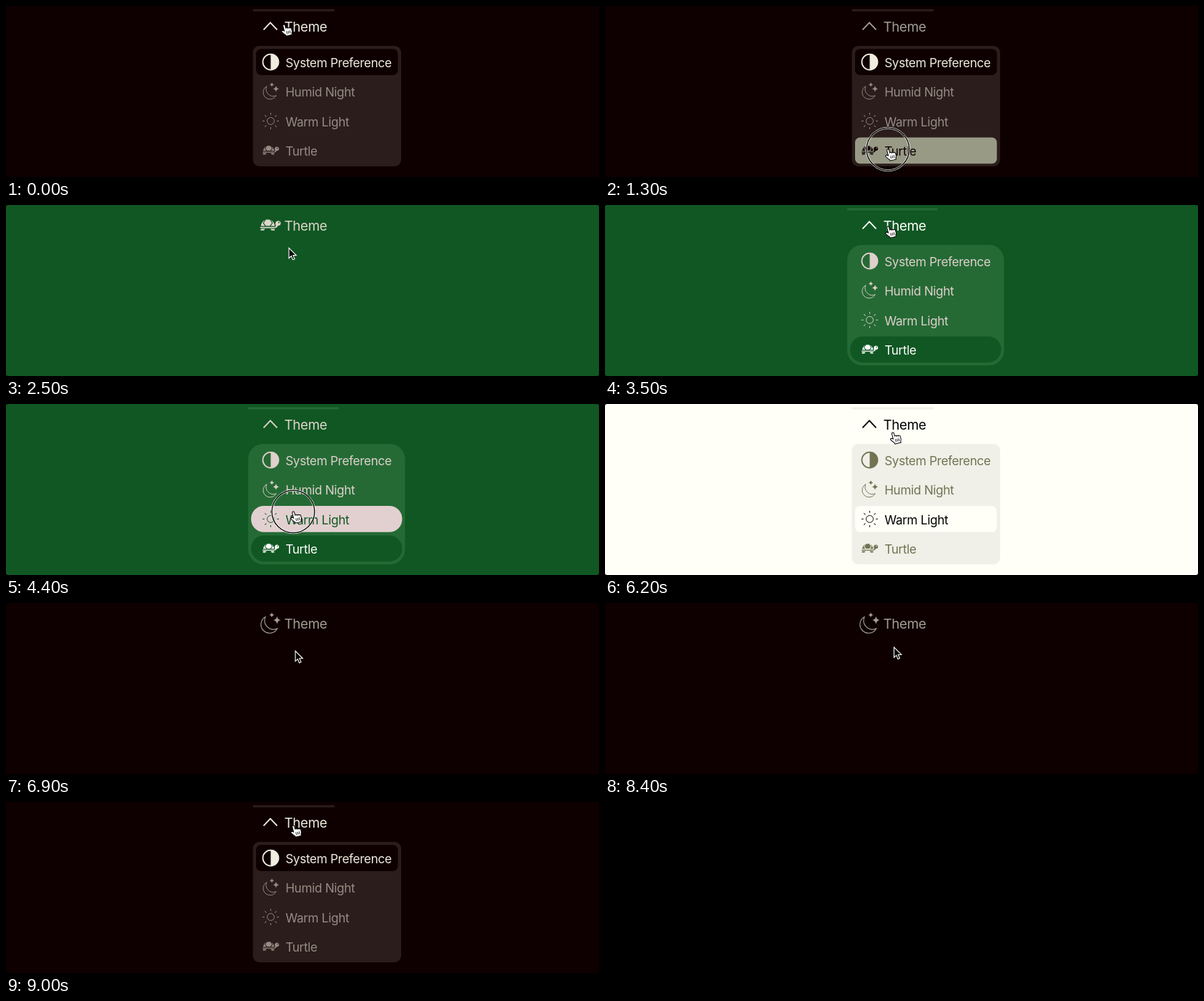
An HTML page that plays this animation: 830 by 240 pixels, repeating every 9200 ms.

```html
<!DOCTYPE html>
<html lang="en">
<head>
<meta charset="utf-8">
<title>Theme menu</title>
<style>
  html, body { margin: 0; width: 100%; height: 100%; overflow: hidden; background: #0a0505; }
  svg { display: block; width: 830px; height: 240px; font: 17.2px Inter, "Open Sans", sans-serif; letter-spacing: -.02em; }
  .title { font-size: 18.8px; }
  .line { fill: none; stroke: currentColor; }
  .fill { fill: currentColor; }
</style>
</head>
<body>
<svg id="stage" viewBox="0 0 830 240"></svg>
<script>
const LOOP = 9200, STEP = 100;
const stage = document.getElementById('stage');
const labels = ['System Preference', 'Humid Night', 'Warm Light', 'Turtle'];

const themes = {
  dark: { bg: '#0e0000', panel: '#2b1d1b', item: '#958c84', active: '#f0ecdf', hoverBg: '#989a86', hoverText: '#0e0000',
    title: '#a49d92', titleHover: '#efeade', x: 345.5, width: 207.5, pad: 4.5, radius: 9, rowRadius: 7, selected: 0, icon: 1 },
  green: { bg: '#105723', panel: '#256a35', item: '#dfd0cb', active: '#ffffff', hoverBg: '#e2d0d0', hoverText: '#105723',
    title: '#dfd5cb', titleHover: '#ffffff', x: 339, width: 219.5, pad: 4, radius: 21, rowRadius: 18, selected: 3, icon: 3 },
  light: { bg: '#fffff7', panel: '#f0f0e8', item: '#717353', active: '#000000', hoverBg: '#717353', hoverText: '#fffff7',
    title: '#717353', titleHover: '#000000', x: 345.5, width: 207.5, pad: 4.5, radius: 9, rowRadius: 7, selected: 2, icon: 2 }
};

// time, theme, menu open
const states = [
  [0, 'dark', true], [1400, 'green', false], [3000, 'green', true], [4500, 'light', false],
  [5700, 'light', true], [6900, 'dark', false], [9000, 'dark', true]
];
const clicks = [1300, 2900, 4400, 5600, 6800, 8900];

const smooth = t => t * t * (3 - 2 * t);
const easeOut = t => 1 - (1 - t) ** 1.78;
const easeIn = t => t ** 1.9;
// start, end, x, y, easing
const moves = [
  [300, 1100, 396, 201, smooth], [2000, 2800, 396, 30, easeOut],
  [3700, 4300, 402, 151, smooth], [4900, 5500, 402, 30, easeOut],
  [5900, 6500, 405, 67, easeIn], [8300, 8700, 402, 33, smooth]
];

function pointer(time) {
  let x = 389, y = 26;
  for (const [start, end, toX, toY, ease] of moves) {
    if (time <= start) break;
    const k = ease(Math.min(1, (time - start) / (end - start)));
    x += (toX - x) * k;
    y += (toY - y) * k;
  }
  return { x, y };
}

const sparkle = (x, y, r) => {
  const n = r * .12;
  return `<path class="fill" d="M${x} ${y - r}Q${x + n} ${y - n} ${x + r} ${y}Q${x + n} ${y + n} ${x} ${y + r}` +
    `Q${x - n} ${y + n} ${x - r} ${y}Q${x - n} ${y - n} ${x} ${y - r}Z"/>`;
};

const rays = Array.from({ length: 8 }, (_, i) =>
  `<path class="line" stroke-width="1.2" d="M0-10.8V-14.4" transform="rotate(${i * 45})"/>`).join('');

// Icons are centred on 0,0 in a box of about 30 units
const icons = [
  '<circle class="line" r="13.8" stroke-width="2.2"/><path class="fill" d="M0-14A14 14 0 0 1 0 14Z"/>',
  '<path class="line" stroke-width="1.15" d="M-7-9.2A12.1 12.1 0 1 0 9.6 7.1A12.5 12.5 0 0 1-7-9.2Z"/>' +
    sparkle(2, -12, 3.8) + sparkle(9.3, -4.7, 5.6),
  '<circle class="line" r="6.2" stroke-width="1.2"/>' + rays,
  `<path class="fill" fill-rule="evenodd" d="M-6.3-8.3H-.7L2.2-3.6-.8.4H-6.2L-9.2-3.6Z
    M-7.8-7.7L-10.5-3.6-7.6.7H-13.2Q-12.3-5.2-7.8-7.7Z M.8-7.7L3.5-3.6.6.7H6.2Q5.3-5.2.8-7.7Z
    M-14.3 2H7.2Q8 .4 7-2.6Q7.4-6.5 11-6.6Q14.6-6.2 14.6-3Q14.3.3 10.8.3Q9.2 3.6 6 3.8H-13.5Q-14.8 3.2-14.3 2Z
    M10.9-4.2a1 1 0 1 0 2 0a1 1 0 1 0-2 0Z
    M-12.8 4.7H-7.2L-9.2 7H-13.4Q-14.5 6.3-12.8 4.7Z M-.2 4.7H5.4Q7 6.3 6 7H1.8Z"/>`
];

const icon = (index, x, y, scale, color) =>
  `<g transform="translate(${x} ${y}) scale(${scale})" color="${color}">${icons[index]}</g>`;
const rect = (x, y, w, h, r, fill) =>
  `<rect x="${x}" y="${y}" width="${w}" height="${h}" rx="${r}" fill="${fill}"/>`;
const text = (x, y, value, fill, name = '') =>
  `<text x="${x}" y="${y}" fill="${fill}" class="${name}">${value}</text>`;

const arrow = '<path d="M0 .4V14.8L3.3 11.7 5.5 17 8 15.9 5.8 10.8H10.3Z" fill="#000" stroke="#fff" stroke-width="1.1"/>';
const hand = `<g transform="rotate(-14)" stroke="#000">
  <path d="M-1.7 9V1.5a1.5 1.5 0 0 1 3 0V6a1.4 1.4 0 0 1 2.7.3a1.4 1.4 0 0 1 2.6.5a1.4 1.4 0 0 1 2.3 1.2V11
  Q8.9 13 7.7 14.5V16.5H-1V15.2Q-3.5 12.5-5.3 9.5Q-5.8 7.5-4 7.6Q-2.8 8-1.7 9Z" fill="#fff"/>
  <path d="M1.3 10v4M3.6 10v4M5.9 10v4" stroke-width=".8"/></g>`;
const ring = '<g fill="none"><circle r="30.8" stroke="#fff"/><circle r="29.8" stroke="#000" stroke-width="1.5"/>' +
  '<circle r="28.8" stroke="#fff" stroke-width=".7"/></g>';

function menu(theme, hovered) {
  let out = rect(theme.x, 56, theme.width, 169, theme.radius, theme.panel);
  labels.forEach((label, i) => {
    const top = 60.2 + i * 41.4;
    const selected = i === theme.selected, hover = i === hovered && !selected;
    const color = selected ? theme.active : hover ? theme.hoverText : theme.item;
    if (selected || hover) {
      out += rect(theme.x + theme.pad, top, theme.width - 2 * theme.pad, 36.8, theme.rowRadius,
        selected ? theme.bg : theme.hoverBg);
    }
    out += icon(i, 370.5, top + 18.4, .8, color) + text(391.2, top + 25.6, label, color);
  });
  return out;
}

function draw(time) {
  const [, name, open] = states.filter(s => s[0] <= time).pop();
  const theme = themes[name];
  const { x, y } = pointer(time);
  const onTitle = y < 54;
  const row = Math.floor((y - 60.2) / 41.4);
  const hovered = open && y >= 60.2 && y - 60.2 - row * 41.4 < 36.8 ? row : -1;
  const color = onTitle ? theme.titleHover : theme.title;

  let out = rect(0, 0, 830, 240, 3, theme.bg);
  if (open || onTitle) out += rect(theme.x, 4.5, theme.width - 93, 3, 1, theme.panel);
  out += open
    ? `<path d="M360.5 33.4L370 23.4L379.5 33.4" fill="none" stroke="${color}" stroke-width="1.9"/>`
    : icon(theme.icon, 370, 28.8, 1, color);
  out += text(389.5, 36.2, 'Theme', color, 'title');
  if (open) out += menu(theme, hovered);
  out += `<g transform="translate(${x} ${y})">${clicks.includes(time) ? ring : ''}` +
    `${onTitle || hovered >= 0 ? hand : arrow}</g>`;
  stage.innerHTML = out;
}

let shown = -1;
function tick() {
  const time = Math.floor(performance.now() % LOOP / STEP) * STEP;
  if (time !== shown) draw(shown = time);
  requestAnimationFrame(tick);
}
tick();
</script>
</body>
</html>
```
